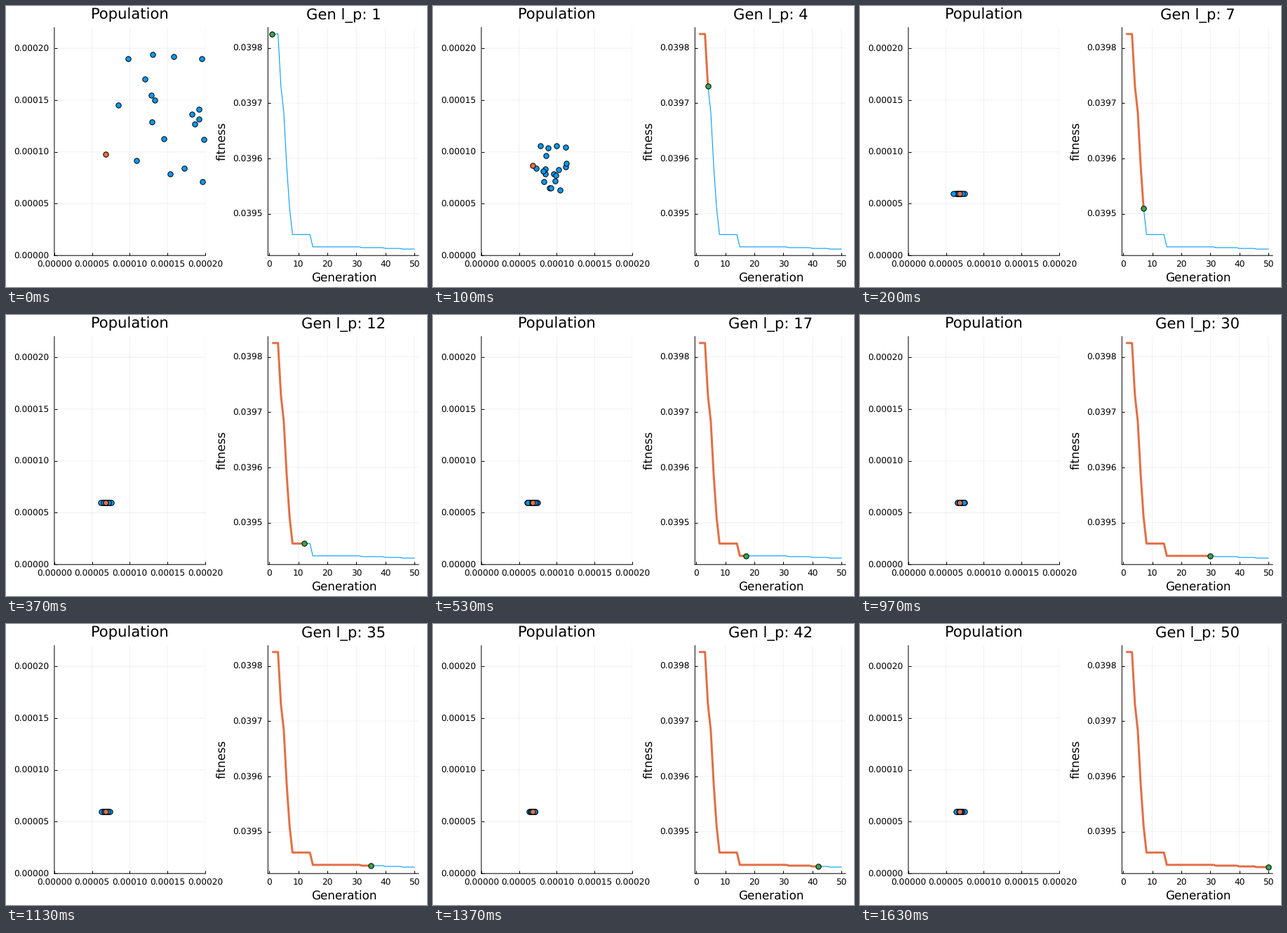
These frames come from a looping animation (600 px wide and 400 px high, 1.66 s). A matplotlib script:

```python
import numpy as np
import matplotlib.pyplot as plt
from matplotlib.animation import FuncAnimation

W, H, DPI = 600, 400, 100
PX = 72 / DPI                      # points per pixel
TICK_MS, TICKS, GENS = 10, 166, 50
BLUE, ORANGE, GREEN = "#009af9", "#e26f46", "#3da44d"
LOW, HIGH, BEST_X = 6e-5, 2e-4, 6.83e-5
FIRST_Y, CROWD, SETTLED = 9.8e-5, 19, 7

plt.rcParams.update({"font.family": "DejaVu Sans", "text.hinting": "none",
                     "text.kerning_factor": 6, "path.snap": False})

# The best fitness falls only in the generations listed, in units of 1e-6
drops = {4: 94, 5: 48, 6: 97, 7: 76.5, 8: 47.2, 15: 22.3, 32: 1.4, 40: 1.4,
         46: 1.2}
gens = np.arange(1, GENS + 1)
fitness = 0.039825 - 1e-6 * np.cumsum([drops.get(g, 0) for g in gens])

start = np.random.default_rng(4).uniform(LOW, HIGH, (CROWD, 2))


def best(gen):
    done = (fitness[0] - fitness[gen - 1]) / (fitness[0] - fitness[SETTLED - 1])
    return BEST_X, FIRST_Y + (LOW - FIRST_Y) * min(done, 1)


def population(gen):
    """Scattered at first, then pressed against the lower bound."""
    if gen == 1:
        return start
    rng = np.random.default_rng(min(gen, GENS - 1))
    if gen < SETTLED:
        keep = (1 - (gen - 1) / (SETTLED - 1)) ** 1.6
        goal = np.array([BEST_X, LOW])
        jitter = rng.uniform(0.6, 1.1, (CROWD, 1))
        return np.maximum(goal + (start - goal) * keep * jitter, LOW)
    spread = 2.4e-6 + 2e-6 * np.exp(-(gen - SETTLED) / 14)
    x = np.maximum(rng.normal(BEST_X, spread, CROWD), LOW)
    return np.column_stack([x, np.full(CROWD, LOW)])


def panel(x0, x1, xlim, ylim, xticks, yticks, fmt):
    top, bottom = 30.7, 355.2
    ax = fig.add_axes([x0 / W, 1 - bottom / H, (x1 - x0) / W,
                       (bottom - top) / H])
    ax.set(xlim=xlim, ylim=ylim, xticks=xticks, yticks=yticks)
    ax.xaxis.set_major_formatter(fmt[0])
    ax.yaxis.set_major_formatter(fmt[1])
    ax.patch.set_visible(False)
    ax.spines[["top", "right"]].set_visible(False)
    for side in ("left", "bottom"):
        ax.spines[side].set_linewidth(PX)
    ax.set_axisbelow(True)
    ax.grid(color="black", alpha=0.06, lw=PX)
    ax.tick_params(direction="in", length=4 * PX, width=PX, pad=7.4 * PX,
                   labelsize=12.1 * PX)
    return ax


def label(x, y, text, size, **kw):
    return fig.text(x / W, 1 - y / H, text, size=size * PX, ha="center", **kw)


def dots(ax, color):
    return ax.plot([], [], "o", ms=7.4 * PX, mfc=color, mec="black",
                   mew=PX, clip_on=False, zorder=5)[0]


fig = plt.figure(figsize=(W / DPI, H / DPI), dpi=DPI, facecolor="white")
steps = np.arange(5) * 5e-5
left = panel(68.9, 283.9, (0, HIGH), (0, 1.1 * HIGH), steps, steps,
             ("{x:.5f}", "{x:.5f}"))
pad = 0.03 * (fitness[0] - fitness[-1])
right = panel(373.3, 588.1, (-0.47, 51.47),
              (fitness[-1] - pad, fitness[0] + pad), np.arange(0, 51, 10),
              np.arange(395, 399) * 1e-4, ("{x:.0f}", "{x:.4f}"))

label(177, 19, "Population", 21.1)
title = label(481.5, 19, "", 21.1)
label(481.5, 393, "Generation", 16.8)
label(308.5, 192.3, "fitness", 16.6, rotation=90, va="center")

crowd = dots(left, BLUE)
leader = dots(left, ORANGE)
right.plot(gens, fitness, color=BLUE, lw=1.1 * PX)
trail = right.plot([], [], color=ORANGE, lw=3 * PX,
                   solid_capstyle="butt")[0]
head = dots(right, GREEN)


def draw(tick):
    # three generations every 100 ms, rounded to whole ticks
    gen = (6 * tick + 3) // 20 + 1
    crowd.set_data(*population(gen).T)
    leader.set_data(*np.reshape(best(gen), (2, 1)))
    trail.set_data(gens[:gen], fitness[:gen])
    head.set_data([gen], [fitness[gen - 1]])
    title.set_text(f"Gen l_p: {gen}")
    return crowd, leader, trail, head, title


anim = FuncAnimation(fig, draw, frames=TICKS, interval=TICK_MS, repeat=True,
                     repeat_delay=0)
plt.show()
```
